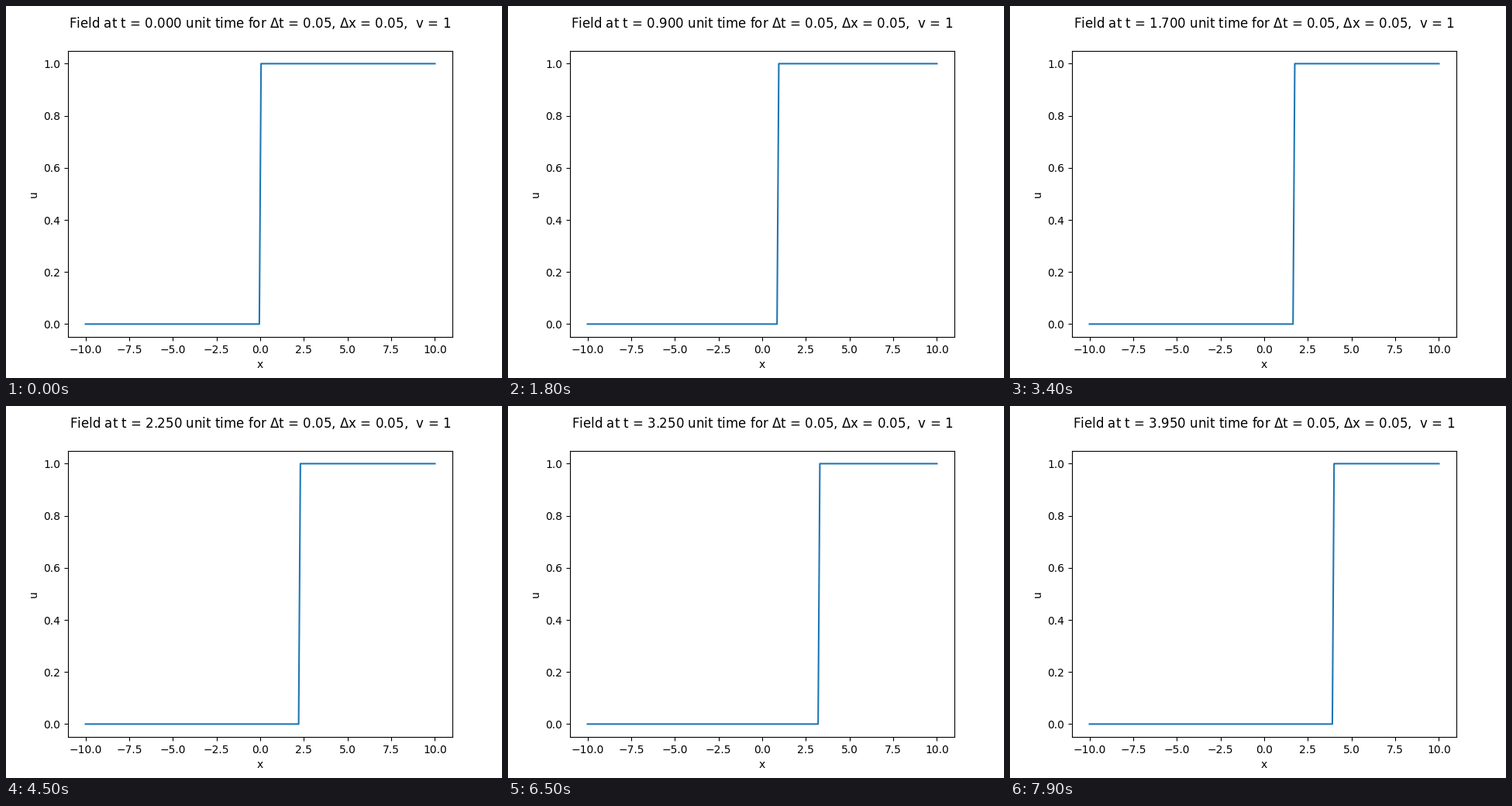
A matplotlib script for the animation above (8000 ms loop, 640x480 px).

```python
import numpy as np
import matplotlib.pyplot as plt
from matplotlib.animation import FuncAnimation

DT = 0.05
DX = 0.05
V = 1
FRAMES = 80
INTERVAL = 100

x = np.linspace(-10, 10, 401)

fig, ax = plt.subplots(figsize=(6.4, 4.8), dpi=100)
line, = ax.plot(x, np.heaviside(x, 0.5))
ax.set_xlabel("x")
ax.set_ylabel("u")


def field(step):
    """Unit step advected to the right by a whole number of cells."""
    cell = np.arange(x.size) - x.size // 2
    return np.heaviside(cell - round(V * DT / DX) * step, 0.5)


def update(step):
    line.set_ydata(field(step))
    ax.set_title(f"Field at t = {step * DT:.3f} unit time for "
                 rf"$\Delta$t = {DT}, $\Delta$x = {DX},  v = {V}" "\n")
    return line, ax.title


anim = FuncAnimation(fig, update, frames=FRAMES, interval=INTERVAL,
                     init_func=lambda: update(0), repeat=True, repeat_delay=0)
plt.show()
```
